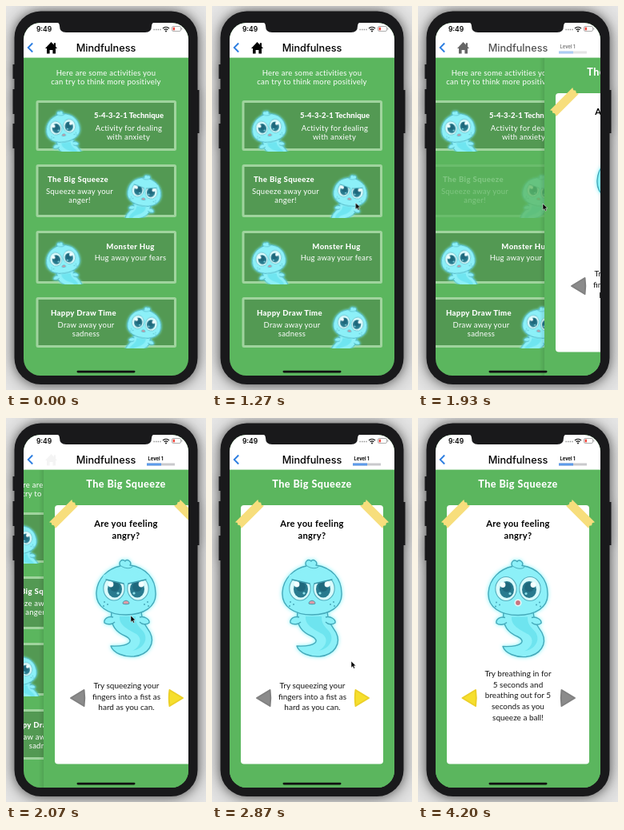
Recreate the animation shown at these times as an HTML page. Size 250 by 480 pixels, loop 4.87 s.

```html
<!DOCTYPE html>
<html lang="en">
<head>
<meta charset="utf-8">
<title>Mindfulness app</title>
<style>
html, body { margin: 0; width: 100%; height: 100%; overflow: hidden; background: #e6e6e6; }
svg { display: block; }
#stage { width: 250px; height: 480px; }
text { font-family: Lato, "Open Sans", sans-serif; text-anchor: middle; }
#phone { filter: drop-shadow(0 0 6px rgba(0, 0, 0, .4)) drop-shadow(0 2px 12px rgba(0, 0, 0, .4)); }

.system { font-family: Inter, Roboto, sans-serif; }
.copy { font-size: 9.5px; letter-spacing: .25px; fill: #fff; }
.name { font-size: 9.6px; letter-spacing: .35px; font-weight: 800; fill: #fff; }
.tight { font-size: 9.5px; letter-spacing: 0; }
.heading { font-size: 12.6px; letter-spacing: .45px; font-weight: 800; fill: #fff; }
.ask { font-size: 11.2px; letter-spacing: .3px; font-weight: 700; }
.tip { font-size: 10px; fill: #161616; }
.box { fill: #539953; stroke: #a0d49e; stroke-width: 3; }
.glow { filter: drop-shadow(0 0 2.5px #7df4fa); }
.skin { fill: #8cf0f8; stroke: #45a9ba; stroke-width: 1.4; stroke-linejoin: round; }
.gray { fill: #8b8b8b; stroke: #808080; }
.yellow { fill: #f6df2d; stroke: #ecd028; }
.gray, .yellow { stroke-width: 2; stroke-linejoin: round; }

/* One loop is 73 ticks of a 15 per second clock. */
.list, .panel, .home, .level, .title, .press, .tap, .first, .second, .cursor {
  animation: 4.87s step-end infinite;
}
.list { animation-name: list; }
.panel { animation-name: panel; }
.home { animation-name: home; }
.level { animation-name: level; }
.title { animation-name: title; }
.press { animation-name: press; }
.tap { animation-name: tap; }
.first { animation-name: first; }
.second { animation-name: second; }
.cursor { animation-name: cursor; }

@keyframes panel {
  0% { transform: translateX(214px); }
  39.6% { transform: translateX(136px); }
  41% { transform: translateX(62px); }
  42.4% { transform: translateX(25px); }
  43.7% { transform: translateX(10.5px); }
  45.1% { transform: translateX(4px); }
  46.5% { transform: translateX(1.5px); }
  47.8%, 100% { transform: none; }
}
@keyframes list {
  0% { transform: none; }
  39.6% { transform: translateX(-21px); }
  41% { transform: translateX(-43px); }
  42.4% { transform: translateX(-54px); }
  43.7% { transform: translateX(-59px); }
  45.1%, 100% { transform: translateX(-61.5px); }
}
@keyframes home {
  0% { opacity: 1; }
  39.6% { opacity: .6; }
  41% { opacity: .25; }
  42.4% { opacity: .04; }
  43.7%, 100% { opacity: 0; }
}
@keyframes level {
  0% { opacity: 0; }
  39.6% { opacity: .5; }
  41% { opacity: .85; }
  42.4%, 100% { opacity: 1; }
}
@keyframes title {
  0% { opacity: 1; }
  39.6% { opacity: .68; }
  41% { opacity: .82; }
  42.4%, 100% { opacity: 1; }
}
@keyframes press {
  0% { opacity: 1; }
  31.4% { opacity: .8; }
  32.8% { opacity: .5; }
  34.2% { opacity: .3; }
  35.5% { opacity: .22; }
  41% { opacity: .6; }
  42.4%, 100% { opacity: 1; }
}
@keyframes tap {
  0% { opacity: 1; }
  67% { opacity: .5; }
  71.2%, 100% { opacity: 1; }
}
@keyframes first { 0% { visibility: visible; } 71.2%, 100% { visibility: hidden; } }
@keyframes second { 0% { visibility: hidden; } 71.2%, 100% { visibility: visible; } }
@keyframes cursor {
  0% { opacity: 0; transform: translate(222px, 440px); }
  4% { opacity: 1; transform: translate(222px, 440px); animation-timing-function: steps(12); }
  20.4% { opacity: 1; transform: translate(183px, 243px); }
  26% { opacity: 1; transform: translate(179.5px, 246px); }
  27.3% { opacity: 1; transform: translate(172px, 246px); }
  28.6% { opacity: 1; transform: translate(163px, 246px); }
  30% { opacity: 1; transform: translate(156px, 247px); }
  58.8% { opacity: 1; transform: translate(174px, 304px); }
  60.2% { opacity: 1; transform: translate(182px, 335px); }
  61.6% { opacity: 1; transform: translate(186px, 349px); }
  63% { opacity: 1; transform: translate(187px, 351px); }
  82.1%, 100% { opacity: 0; transform: translate(187px, 351px); }
}
</style>
</head>
<body>
<svg id="stage" viewBox="0 0 250 480">
  <defs>
    <clipPath id="screen"><rect x="22" y="21" width="206" height="441" rx="21"/></clipPath>
    <linearGradient id="edge"><stop offset="0" stop-opacity="0"/><stop offset="1" stop-opacity=".1"/></linearGradient>

    <g id="eye">
      <ellipse rx="13.2" ry="15" fill="#d9fbfc" stroke="#55aebd" stroke-width="1.1"/>
      <ellipse cx="1" cy="1" rx="9" ry="10.5" fill="#287a8e"/>
      <ellipse cx="1" cy="-2" rx="6" ry="6" fill="#1f687c"/>
      <circle cx="-4" cy="-5" r="3.4" fill="#f4ffff"/>
      <circle cx="5" cy="6" r="1.6" fill="#8fdfe8"/>
    </g>
    <g id="dots" fill="#4aa9ba">
      <circle cx="23" cy="17" r="1"/><circle cx="27" cy="14" r="1"/><circle cx="28" cy="19" r="1"/>
    </g>
    <g id="ghost">
      <path class="skin" d="M-18 26C-20 44-12 52 0 57C10 62 6 70-19 69C-16 78-2 83 10 82C28 80 37 66 30 52C26 45 20 40 19 26Z"/>
      <path d="M-8 32C-9 43 2 48 13 54C21 60 18 70 8 75C24 72 29 58 20 49C13 42 12 38 12 32Z" fill="#62e0ec" opacity=".7"/>
      <path class="skin" d="M-16 33C-22 31-28 35-27 40C-23 43-17 42-14 39M17 33C23 31 30 36 29 40C25 43 20 42 17 39"/>
      <path class="skin" d="M-37 2C-36-16-22-28-7-31C-10-36-5-41-1-37C1-41 8-36 5-32C25-29 37-15 37 3C38 20 22 30 0 30C-22 30-38 20-37 2Z"/>
      <path d="M-6-31C-2-28 5-27 8-30" fill="none" stroke="#45a9ba" stroke-linecap="round"/>
      <use href="#eye" x="-15" y="-3"/>
      <use href="#eye" transform="translate(15 -3) scale(-1 1)"/>
      <use href="#dots"/>
      <use href="#dots" transform="scale(-1 1)"/>
    </g>
    <g id="frown">
      <path d="M-30-14L-2-9V-17L-14-23L-28-20ZM30-14L2-9V-17L14-23L28-20Z" fill="#8cf0f8"/>
      <path d="M-25-14L-3-9M25-14L3-9" stroke="#3c98aa" stroke-width="1.4" stroke-linecap="round"/>
    </g>
    <g id="pout">
      <path d="M-4 16C-4 11 4 11 4 16C2 17-2 17-4 16Z" fill="#dd9aa6" stroke="#4a97a7"/>
    </g>
    <g id="calm"><use href="#ghost"/><use href="#pout"/></g>
    <g id="cross"><use href="#ghost"/><use href="#frown"/><use href="#pout"/></g>
    <path id="arrow" d="M1 0L17.5-10Q19 0 17.5 10Z"/>
    <path id="tape" d="M-20-5.5L-18.5-3L-20-1L-18.5 1.5L-20 5.5H20L18.5 2.5L20 0L18.5-2.5L20-5.5Z" fill="#f7de7c"/>
  </defs>

  <g id="phone" fill="#19191b">
    <path d="M8.5 73h4v18h-4zM8.5 104h4v31h-4zM8.5 147h4v31h-4zM237.5 105h4v54h-4z"/>
    <rect x="10.5" y="6.5" width="229" height="466.5" rx="33"/>
  </g>

  <g clip-path="url(#screen)">
    <rect x="22" y="21" width="206" height="441" fill="#5bb65e"/>

    <g class="list">
      <text class="copy" x="125" y="87">Here are some activities you</text>
      <text class="copy" x="125" y="98">can try to think more positively</text>

      <svg x="37" y="117" width="177" height="65">
        <rect class="box" x="2" y="2.5" width="172.5" height="60" rx="1"/>
        <use class="glow" href="#calm" transform="translate(34 36) rotate(-9) scale(.57)"/>
        <text class="name tight" x="116.5" y="23">5-4-3-2-1 Technique</text>
        <text class="copy" x="116.5" y="39">Activity for dealing</text>
        <text class="copy" x="116" y="50">with anxiety</text>
      </svg>

      <g class="press">
        <svg x="37" y="197" width="177" height="68">
          <rect class="box" x="2" y="2.5" width="172.5" height="63" rx="1"/>
          <use class="glow" href="#cross" transform="translate(136 36) rotate(9) scale(-.57 .57)"/>
          <text class="name" x="53" y="23">The Big Squeeze</text>
          <text class="copy" x="55" y="38">Squeeze away your</text>
          <text class="copy" x="55" y="49">anger!</text>
        </svg>
      </g>

      <svg x="37" y="280" width="177" height="68">
        <rect class="box" x="2" y="2.5" width="172.5" height="63" rx="1"/>
        <use class="glow" href="#calm" transform="translate(34 37) rotate(-9) scale(.57)"/>
        <text class="name" x="118.5" y="24">Monster Hug</text>
        <text class="copy" x="118.5" y="38">Hug away your fears</text>
      </svg>

      <svg x="37" y="363" width="177" height="65">
        <rect class="box" x="2" y="2.5" width="172.5" height="60" rx="1"/>
        <use class="glow" href="#calm" transform="translate(136 35) rotate(9) scale(-.57 .57)"/>
        <text class="name" x="60" y="24">Happy Draw Time</text>
        <text class="copy" x="63" y="39">Draw away your</text>
        <text class="copy" x="63" y="50">sadness</text>
      </svg>
    </g>

    <g class="panel">
      <rect x="16" y="65" width="6" height="397" fill="url(#edge)"/>
      <rect x="22" y="65" width="206" height="397" fill="#5bb65e"/>
      <text class="heading" x="125" y="87">The Big Squeeze</text>
      <rect x="36" y="109" width="178" height="323.5" rx="4" fill="#fff"/>
      <use href="#tape" transform="translate(47 120) rotate(-45)"/>
      <use href="#tape" transform="translate(203 120) rotate(45)"/>
      <text class="ask" x="125" y="136">Are you feeling</text>
      <text class="ask" x="125" y="150.5">angry?</text>

      <g class="first">
        <use class="glow" href="#cross" x="125" y="216"/>
        <text class="tip" x="125.5" y="338">Try squeezing your</text>
        <text class="tip" x="125.5" y="351.5">fingers into a fist as</text>
        <text class="tip" x="125.5" y="365">hard as you can.</text>
        <use class="gray" href="#arrow" x="55" y="350"/>
        <g class="tap"><use class="yellow" href="#arrow" transform="translate(197 350) scale(-1 1)"/></g>
      </g>
      <g class="second">
        <g class="glow" transform="translate(125 216.5)">
          <use href="#ghost"/>
          <circle cy="14.5" r="3.7" fill="#c9747f" stroke="#e9f7f7" stroke-width="1.6"/>
        </g>
        <text class="tip" x="125" y="323">Try breathing in for</text>
        <text class="tip" x="125" y="336.5">5 seconds and</text>
        <text class="tip" x="125" y="350">breathing out for 5</text>
        <text class="tip" x="125" y="364">seconds as you</text>
        <text class="tip" x="125" y="378">squeeze a ball!</text>
        <use class="yellow" href="#arrow" x="54.5" y="350"/>
        <use class="gray" href="#arrow" transform="translate(197 350) scale(-1 1)"/>
      </g>
    </g>

    <rect x="22" y="21" width="206" height="43.6" fill="#fff"/>
    <path d="M63 20Q67 21 67 25Q67 33 75 33H174Q182 33 182 25Q182 21 186 20Z" fill="#19191b"/>
    <text class="system" x="47.5" y="32" font-size="8.5" font-weight="600">9:49</text>
    <path d="M184.5 29.5H194" stroke="#888" stroke-width="1.3" stroke-dasharray="1.3 1.3"/>
    <g fill="none" stroke="#111" stroke-width="1.2">
      <path d="M196 28Q200 24.5 204 28M197.6 29.9Q200 27.8 202.4 29.9"/>
      <circle cx="200" cy="31.4" r=".4"/>
    </g>
    <rect x="207.5" y="25.5" width="11" height="6" rx="1.6" fill="#fff" stroke="#999" stroke-width=".8"/>
    <rect x="208.7" y="26.7" width="2.2" height="3.6" fill="#f0392f"/>
    <path d="M219.8 27.5v2" stroke="#999"/>

    <path d="M33.2 46.5L27.7 52L33.2 57.5" fill="none" stroke="#2a7ce0" stroke-width="1.8"/>
    <path class="home" d="M49 53L56.5 45L59.8 48.5V46.3H62V50.8L64 53H62V59.5H58.4V55H54.6V59.5H51V53Z"/>
    <text class="title system" x="125" y="57" font-size="12.7" font-weight="500">Mindfulness</text>
    <g class="level">
      <text class="system" x="187" y="52.5" font-size="5.8" font-weight="700">Level 1</text>
      <rect x="176" y="56.5" width="35" height="3" fill="#c9c9cc"/>
      <rect x="176" y="56.5" width="18" height="3" fill="#5c9bea"/>
    </g>

    <rect x="88.5" y="455.7" width="73" height="2.8" rx="1.4" fill="#111"/>
  </g>

  <path class="cursor" d="M0 0V8.2L1.9 6.4L3.2 9.2L4.6 8.6L3.4 5.8H5.9Z" stroke="#fff" stroke-width=".5"/>
</svg>
</body>
</html>
```
